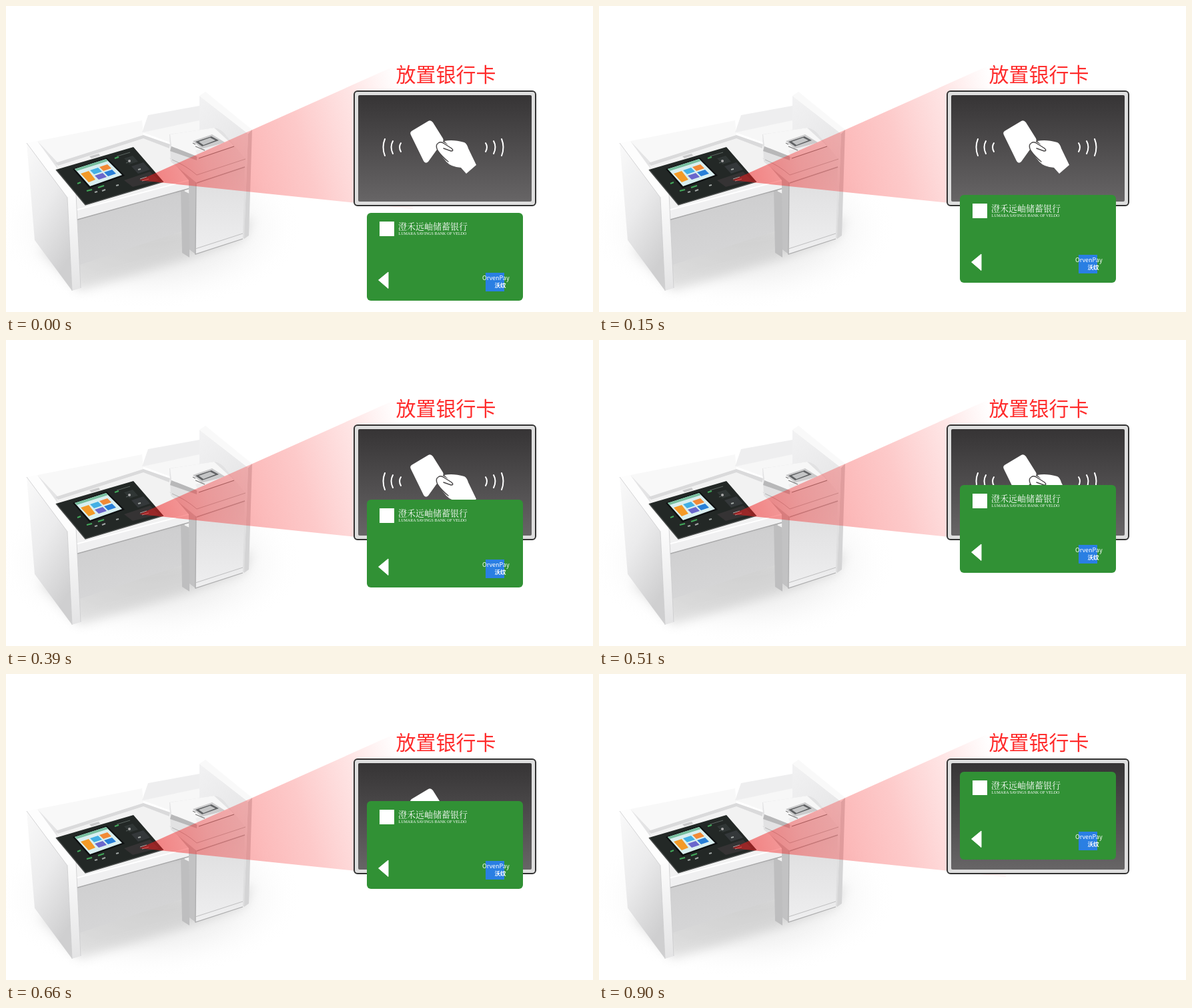
An HTML page for the animation above (1970 ms loop, 880 px wide and 460 px high).

```html
<!DOCTYPE html>
<html lang="zh-CN">
<head>
<meta charset="utf-8">
<title>放置银行卡</title>
<style>
html, body { margin: 0; width: 100%; height: 100%; overflow: hidden; background: #fff; }
svg { display: block; }
text { font-family: "Noto Sans CJK SC", "Noto Sans CJK", sans-serif; fill: #fff; }
.serif { font-family: "Noto Serif CJK SC", "Noto Serif", "Noto Sans CJK SC", serif; }
.latin { font-family: "Liberation Serif", serif; }
</style>
</head>
<body>
<svg width="880" height="460" viewBox="0 0 880 460">
  <defs>
    <radialGradient id="floor">
      <stop offset="0" stop-color="#cfcfcf"/>
      <stop offset=".6" stop-color="#ececec"/>
      <stop offset="1" stop-color="#fff" stop-opacity="0"/>
    </radialGradient>
    <linearGradient id="side" x2=".5" y2="1">
      <stop offset="0" stop-color="#fafafa"/>
      <stop offset=".5" stop-color="#ebebec"/>
      <stop offset="1" stop-color="#cfcfd0"/>
    </linearGradient>
    <linearGradient id="edge" x2="0" y2="1">
      <stop offset="0" stop-color="#fcfcfc"/>
      <stop offset="1" stop-color="#e4e4e5"/>
    </linearGradient>
    <linearGradient id="under" x2=".25" y2="1">
      <stop offset="0" stop-color="#b4b4b5"/>
      <stop offset=".3" stop-color="#cfcfd0"/>
      <stop offset="1" stop-color="#d6d6d7"/>
    </linearGradient>
    <linearGradient id="wall" x2=".3" y2="1">
      <stop offset="0" stop-color="#f2f2f3"/>
      <stop offset="1" stop-color="#dededf"/>
    </linearGradient>
    <linearGradient id="front" x2="0" y2="1">
      <stop offset="0" stop-color="#dcdcdd"/>
      <stop offset="1" stop-color="#efeff0"/>
    </linearGradient>
    <linearGradient id="beam" gradientUnits="userSpaceOnUse" x1="200" y1="262" x2="600" y2="150">
      <stop offset="0" stop-color="#f01818" stop-opacity=".56"/>
      <stop offset=".25" stop-color="#f43030" stop-opacity=".41"/>
      <stop offset=".6" stop-color="#f84040" stop-opacity=".28"/>
      <stop offset=".82" stop-color="#fa5050" stop-opacity=".15"/>
      <stop offset="1" stop-color="#ff6060" stop-opacity="0"/>
    </linearGradient>
    <linearGradient id="glass" x2="0" y2="1">
      <stop offset="0" stop-color="#363435"/>
      <stop offset="1" stop-color="#676566"/>
    </linearGradient>
    <filter id="soft" x="-20%" y="-30%" width="140%" height="160%"><feGaussianBlur stdDeviation="8"/></filter>
  </defs>

  <!-- floor shading -->
  <ellipse cx="215" cy="335" rx="230" ry="122" fill="url(#floor)" opacity=".55"/>
  <polygon points="50,365 110,428 275,380 356,350 370,320 100,350" fill="#aaa" opacity=".36" filter="url(#soft)"/>

  <!-- back and right walls -->
  <polygon points="47,203 204,172 206,196 82,240" fill="#f8f8f8"/>
  <polygon points="47,203 80,238 82,262 104,284 104,302 70,260" fill="#e4e4e5"/>
  <polygon points="204,190 213,164 290,150 290,184 245,196" fill="#eeeeef"/>
  <polygon points="205,190 290,172 290,190 246,205" fill="#f7f7f7"/>
  <polygon points="290,135 363,192 357,350 340,340 290,200" fill="url(#wall)"/>
  <polygon points="290,135 299,129 369,186 363,192" fill="#f9f9f9"/>
  <polygon points="363,192 369,186 364,345 357,350" fill="#d4d4d5"/>

  <!-- desk -->
  <polygon points="104,322 268,276 268,337 111,389" fill="url(#under)"/>
  <polygon points="262,276 275,282 275,378 264,371" fill="#bebebf"/>
  <polygon points="76,238 206,195 246,214 274,262 104,308 82,264" fill="#f2f2f2"/>
  <polygon points="74,236 206,194 246,208 245,214 206,199 78,240" fill="#dadadb"/>
  <polygon points="103,305 274,260 276,274 104,322" fill="#f0f0f1"/>
  <path d="M104 307L274 262" stroke="#fff" stroke-width="2"/>
  <path d="M104 322L276 274" stroke="#a9a9aa" stroke-width="1.5"/>
  <polygon points="125,226 139,222 141,225 128,229" fill="#c9c9ca"/>

  <!-- left wall -->
  <polygon points="31,206 92,288 99,428 43,352" fill="url(#side)"/>
  <polygon points="31,206 47,203 105,283 92,288" fill="#fdfdfd"/>
  <polygon points="92,288 105,283 112,424 99,428" fill="url(#edge)"/>
  <path d="M31 206L92 288L99 428M105 283L112 424" fill="none" stroke="#cbcbcc" stroke-width=".8"/>

  <!-- control panel -->
  <polygon points="75,246 191,212 236,264 119,299" fill="#232826"/>
  <path d="M75 246L119 299L236 264" fill="none" stroke="#494c4b" stroke-width="1.5"/>
  <polygon points="100,245 151,228 178,255 125,274" fill="#0e1011"/>
  <polygon points="103,245 150,230 174,254 126,271" fill="#d9eff0"/>
  <polygon points="103,245 150,230 153,233 106,248" fill="#78bf9f"/>
  <polygon points="112,252 124,248 134,261 124,265" fill="#f39a27"/>
  <polygon points="126,247 138,243 144,249 132,253" fill="#43afe4"/>
  <polygon points="140,242 152,238 158,244 146,248" fill="#f18a36"/>
  <polygon points="133,255 145,251 151,257 139,261" fill="#6a67cc"/>
  <polygon points="147,250 159,246 165,252 153,256" fill="#287fd7"/>
  <path d="M166 226l20-6M180 236l7-2" stroke="#5c6662"/>
  <polygon points="177,229 190,225 198,234 185,238" fill="#303635"/>
  <circle cx="185" cy="233" r="2" fill="#aaa"/>
  <polygon points="188,241 206,235 216,246 198,252" fill="#34383a"/>
  <polygon points="177,262 216,249 229,262 190,272" fill="#353334"/>
  <path d="M121 278l8-2M138 273l9-3M107 267l5-2M163 229l6-2" stroke="#42a95b" stroke-width="2"/>
  <path d="M133 280l4-1M144 278l5-2M165 270l4-1M198 246l4-1" stroke="#a1a7a5" stroke-width="2"/>
  <path d="M201 260l10-3M204 263l10-3" stroke="#b7a5a5"/>

  <!-- printer cabinet -->
  <polygon points="245,228 286,262 284,373 275,366 274,262" fill="#c2c2c3"/>
  <polygon points="285,263 358,240 355,350 284,373" fill="url(#front)"/>
  <path d="M285 263L284 373L355 350" fill="none" stroke="#adadae" stroke-width="1.3"/>
  <path d="M284 365L355 342" stroke="#bebebf"/>
  <path d="M245 193L312 183Q324 185 331 196L359 230L358 242L286 266L247 234Z" fill="#e2e2e3"/>
  <polygon points="246,193 312,183 339,208 286,226 248,211" fill="#f7f7f7"/>
  <polygon points="248,211 286,226 286,232 246,218" fill="#b8b8b9"/>
  <polygon points="280,203 309,193 328,205 295,216" fill="#cbcbcc"/>
  <polygon points="284,204 308,196 319,202 294,211" fill="#606264"/>
  <polygon points="289,204 306,198 314,202 296,209" fill="#c4c5c6"/>
  <polygon points="284,217 335,204 342,211 289,229" fill="#eeeeef"/>
  <path d="M280 206l4 2M284 211l14 6M289 229L342 211" stroke="#777" stroke-width="1.2"/>
  <path d="M249 231Q270 240 286 254L359 230" fill="none" stroke="#b0b0b1"/>
  <path d="M286 266L358 242" stroke="#a5a5a6" stroke-width="1.5"/>

  <polygon points="200,262 610,78 610,305" fill="url(#beam)"/>

  <text x="584.5" y="114" font-size="30" style="fill:#ff2c2c">放置银行卡</text>

  <!-- reader -->
  <rect x="522" y="128" width="272" height="172" rx="5" fill="#dedede" stroke="#323232" stroke-width="2"/>
  <rect x="528" y="134" width="260" height="160" rx="2" fill="url(#glass)"/>
  <g fill="none" stroke="#fff" stroke-width="2" stroke-linecap="round">
    <path id="waves" d="M568 200Q563 212 568 225M580 203Q575 212 580 222M592 206Q588 212 592 219"/>
    <use href="#waves" transform="matrix(-1 0 0 1 1311 0)"/>
  </g>
  <path d="M608 188L633 173Q637 171 640 175L655 199Q657 203 653 206L633 234Q629 238 626 233L607 194Q605 190 608 188Z" fill="#fff"/>
  <path d="M647 206Q650 202 655 204L663 209L657 203Q670 200 687 205Q691 207 693 214L705 239L690 252L682 243Q667 242 660 234L648 219Q643 211 647 206Z" fill="#fff"/>
  <path d="M663 234Q653 226 647 217Q643 209 648 206Q652 203 657 207L668 214Q672 218 667 218L656 214" fill="none" stroke="#484647" stroke-width="1.4" stroke-linecap="round"/>

  <g id="card">
    <rect x="541" y="311" width="234" height="132" rx="6" fill="#319135"/>
    <rect x="560" y="324" width="22" height="22" fill="#fff"/>
    <text class="serif" x="588" y="336" font-size="13">澄禾远岫储蓄银行</text>
    <text class="latin" x="588.5" y="343.7" font-size="6">LUMARA SAVINGS BANK OF VELDO</text>
    <path d="M558.5 412L573 400V424.5Z" fill="#fff" stroke="#fff" stroke-linejoin="round"/>
    <rect x="719" y="401" width="28" height="28" fill="#2a7fe3"/>
    <text x="714" y="412" font-size="9" font-weight="500">OrvenPay</text>
    <text x="732.5" y="423" font-size="8.5" font-weight="700">沃纹</text>
  </g>
</svg>
<script>
const LOOP = 1970, TICK = 30, STEPS = 30, RISE = 164;
const card = document.getElementById("card");
const start = performance.now();

function draw(now) {
  const t = Math.max(0, now - start) % LOOP;
  const step = Math.min(STEPS, Math.floor(t / TICK));
  card.setAttribute("transform", `translate(0 ${-Math.round(RISE * step / STEPS)})`);
  requestAnimationFrame(draw);
}
draw(start);
</script>
</body>
</html>
```
